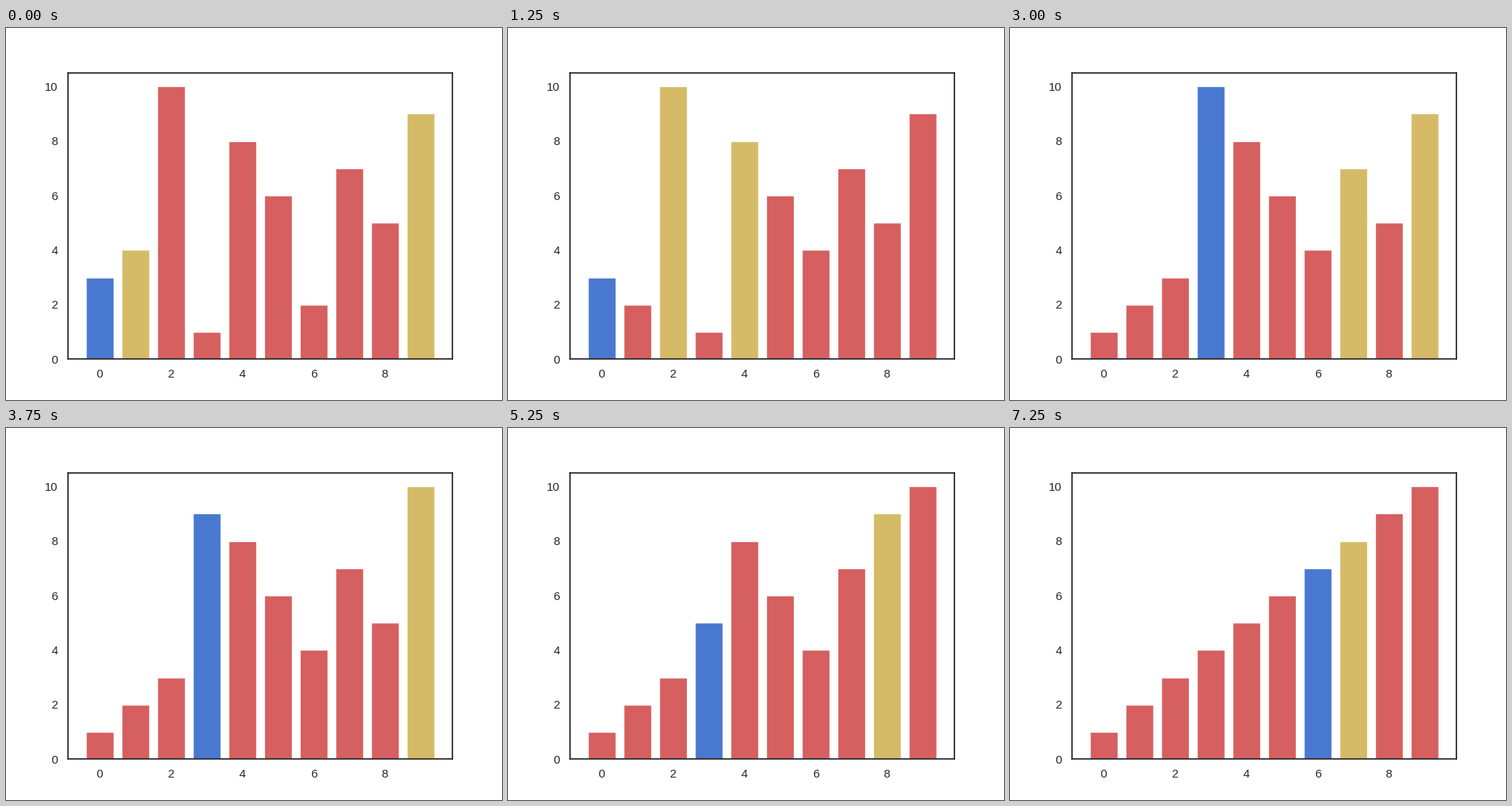
A matplotlib script that plays this animation: 640 px wide and 480 px high, repeating every 7.5 s.

```python
import matplotlib.pyplot as plt
from matplotlib.animation import FuncAnimation

START = [3, 4, 10, 1, 8, 6, 2, 7, 5, 9]
BLUE, RED, YELLOW = "#4878D0", "#D65F5F", "#D5BB67"
INK = "0.15"


def quick_sort(a, start, end):
    """Sort in place, yielding (values, pivot, marked positions) per step."""
    if start >= end:
        return
    left, right = start + 1, end
    pivot = a[start]
    while left <= right:
        yield a[:], start, (left, right)
        if a[left] > pivot > a[right]:
            a[left], a[right] = a[right], a[left]
        if a[left] <= pivot:
            left += 1
        if a[right] >= pivot:
            right -= 1
    if right != start:
        a[start], a[right] = a[right], a[start]
        yield a[:], start, (right,)
    yield from quick_sort(a, start, right - 1)
    yield from quick_sort(a, right + 1, end)


steps = list(quick_sort(START[:], 0, len(START) - 1))

plt.rcParams.update({
    "font.family": "Liberation Sans",
    "axes.linewidth": 1.25,
    "axes.edgecolor": INK,
    "axes.axisbelow": True,
})
fig, ax = plt.subplots(figsize=(6.4, 4.8), dpi=100)
bars = ax.bar(range(len(START)), START, color=RED, edgecolor="white", linewidth=1)
ax.set_xlim(-0.89, 9.89)
ax.set_ylim(0, 10.5)
ax.set_xticks(range(0, 10, 2))
ax.set_yticks(range(0, 11, 2))
ax.tick_params(length=6, pad=3.5, bottom=False, left=False,
               labelsize=11, labelcolor=INK)


def draw(i):
    values, pivot, marked = steps[i]
    for k, (bar, value) in enumerate(zip(bars, values)):
        bar.set_height(value)
        bar.set_facecolor(BLUE if k == pivot else YELLOW if k in marked else RED)
    return bars


anim = FuncAnimation(fig, draw, frames=len(steps), interval=250, repeat=True)
plt.show()
```
